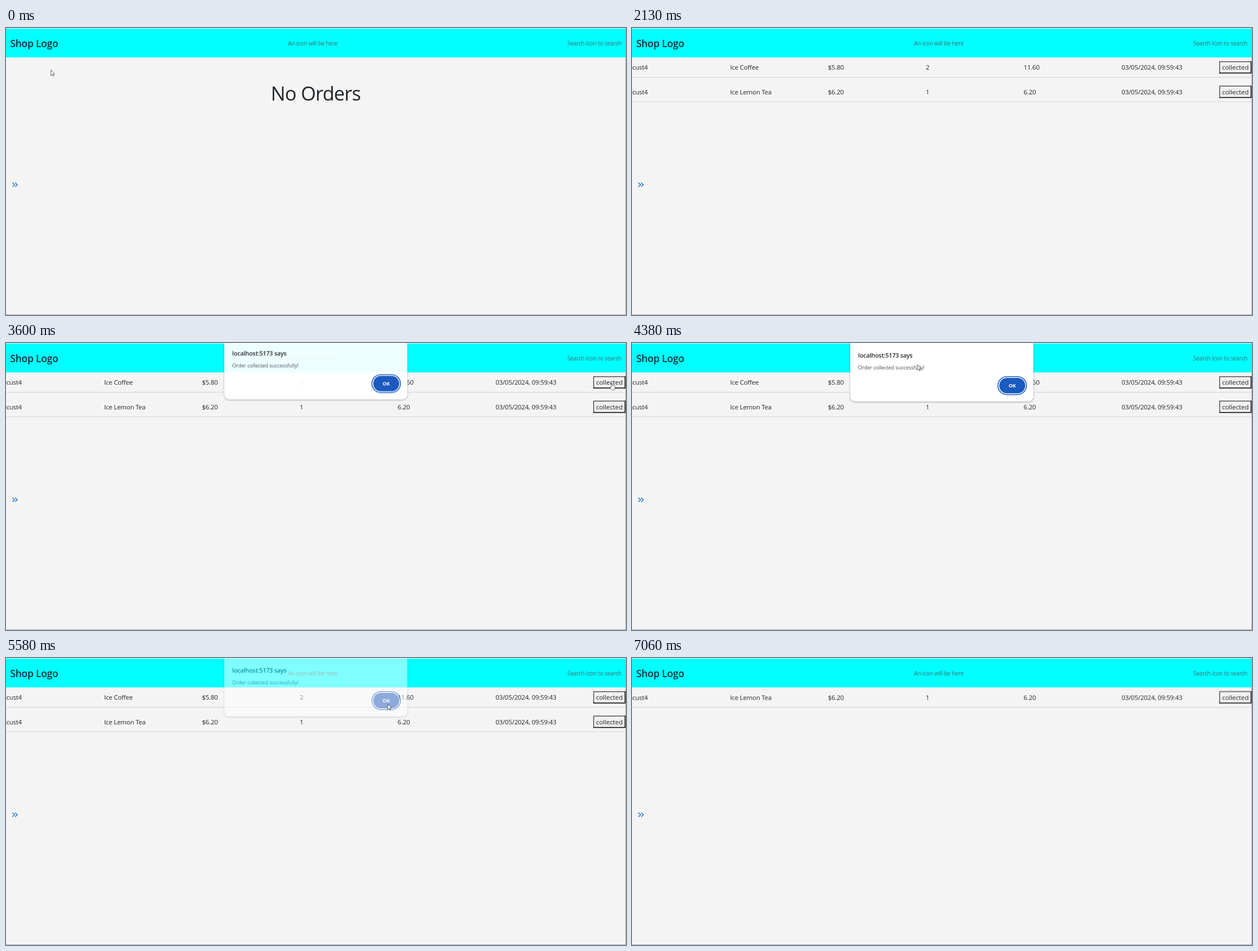
An HTML page for the animation above (7310 ms loop, 1098 by 510 pixels).

```html
<!DOCTYPE html>
<html lang="en">
<head>
<meta charset="utf-8">
<title>Shop orders</title>
<style>
  html, body { margin: 0; width: 100%; height: 100%; overflow: hidden; background: #f4f4f4; }
  svg { display: block; width: 1098px; height: 510px; font-family: "Open Sans", "Noto Sans", sans-serif; }
  text { white-space: pre; }
  .brand { font-size: 17.4px; font-weight: 600; letter-spacing: -.012em; fill: #123133; }
  .nav { font-size: 9.9px; letter-spacing: -.01em; fill: #456b6b; }
  .title { font-size: 34.2px; letter-spacing: -.021em; fill: #212529; }
  .cell { font-size: 11.4px; letter-spacing: -.016em; fill: #212529; }
  .btn { font-size: 11.5px; letter-spacing: -.006em; fill: #212529; }
  .edge { fill: none; stroke-width: 1.5; }
  .head { font-size: 10.7px; font-weight: 600; letter-spacing: -.014em; fill: #26282b; }
  .msg { font-size: 9.1px; letter-spacing: -.01em; fill: #4b4d50; }
  .ok { font-size: 8.8px; font-weight: 700; fill: #fff; }
  #panel { fill: #fff; filter: drop-shadow(0 1px 1.5px rgba(0, 0, 0, .35)); }
  #pointer { fill: #fff; stroke: #333; stroke-width: .75; stroke-linejoin: round; }
</style>
</head>
<body>
<svg viewBox="0 0 1098 510">
  <rect width="1098" height="510" fill="#f4f4f4"/>
  <rect y="1" width="1098" height="51.3" fill="#0ff"/>
  <text class="brand" x="7.4" y="33.9">Shop Logo</text>
  <text class="nav" x="543.3" y="30.8" text-anchor="middle">An icon will be here</text>
  <text class="nav" x="1090" y="30.8" text-anchor="end">Search Icon to search</text>

  <text class="title" id="empty" x="548.6" y="129" text-anchor="middle">No Orders</text>
  <g id="orders"></g>

  <g fill="#1976d2" transform="translate(7.3 269.8) scale(.723)">
    <path d="M6.41 6 5 7.41 9.58 12 5 16.59 6.41 18l6-6z"/>
    <path d="m13 6-1.41 1.41L16.17 12l-4.58 4.59L13 18l6-6z"/>
  </g>
  <path d="M1097.5 0V509.5H0" fill="none" stroke="#a9a9a9"/>

  <g id="dialog">
    <path id="panel" d="M386.5 -6H710.8V95a9 9 0 0 1-9 9H395.5a9 9 0 0 1-9-9z"/>
    <text class="head" x="400.6" y="25.8">localhost:5173 says</text>
    <text class="msg" x="400.6" y="47">Order collected successfully!</text>
    <rect x="648" y="59.7" width="50.6" height="32" rx="16" fill="#fff" stroke="#1b5cc0" stroke-width="1.6"/>
    <rect id="ok" x="650.4" y="62" width="46" height="27.4" rx="13.7"/>
    <text class="ok" x="673.3" y="78.9" text-anchor="middle">OK</text>
  </g>

  <g id="pointer">
    <path id="arrow" d="M.5.5V10.4L2.8 8.3 4.2 11.6 5.8 10.9 4.4 7.7H7.3Z"/>
    <path id="hand" d="M3.2 8.6V1.6a.9.9 0 0 1 1.8 0V5.6q.9-.7 1.7.2q.9-.6 1.6.3q1.3-.4 1.3.9V10q0 1.6-1.1 3.6H4.3Q2.6 11.6.8 8.9q.2-1.4 2.4-.3z"/>
  </g>
</svg>
<script>
const LOOP = 7310, TICK = 135, PITCH = 43.5, COLUMN = 173.3;
const $ = id => document.getElementById(id);
const at = (x, y) => `translate(${x}px, ${y}px)`;

// Order table
const orders = [
  ['cust4', 'Ice Coffee', '$5.80', '2', '11.60', '03/05/2024, 09:59:43'],
  ['cust4', 'Ice Lemon Tea', '$6.20', '1', '6.20', '03/05/2024, 09:59:43']
];
const rowMarkup = (cells, i) => `
  <g id="row${i}"><g transform="translate(0 ${i * PITCH})">
    ${cells.map((c, k) => `<text class="cell" x="${.4 + k * COLUMN}" y="74">${c}</text>`).join('')}
    <rect x="1040.5" y="59.3" width="56" height="21" fill="#f0f0f0"/>
    <path class="edge" id="lit${i}" stroke="#555" d="M1040.7 80.6V59.7H1096.8"/>
    <path class="edge" id="dark${i}" stroke="#000" d="M1040 80.1H1096.4V59"/>
    <text class="btn" x="1068.6" y="74" text-anchor="middle">collected</text>
    <rect y="87" width="1097" height="1" fill="#d2d4d6"/>
  </g></g>`;
$('orders').innerHTML = orders.map(rowMarkup).join('');

function play(id, prop, steps, ease) {
  const frames = steps.map(([t, v], i) => ({ offset: t / LOOP, [prop]: v, easing: ease(i) }));
  frames.push({ offset: 1, [prop]: steps[steps.length - 1][1] });
  $(id).animate(frames, { duration: LOOP, iterations: Infinity });
}
// Each value holds until the next step.
const hold = (id, prop, ...steps) => play(id, prop, steps, () => 'step-end');
// Show an element from one time to another.
const show = (id, from, to) => hold(id, 'opacity', [0, 0], [from, 1], [to, 0]);

const route = [
  [0, 79, 74], [165, 79, 74], [300, 365, 126], [810, 771, 137], [960, 745, 137],
  [1200, 446, 25], [1470, 162, 110], [1740, 740, 217], [1860, 930, 214],
  [2010, 1070, 121], [2130, 1110, 80], [2275, 1110, 80],
  [2410, 1088, 67], [2800, 1068.7, 70], [3705, 1068.7, 70],
  [3840, 930, 65], [4110, 716, 48], [4500, 399, 33], [4770, 656, 100], [4920, 723, 95],
  [5310, 675.5, 81], [6145, 675.5, 81], [6400, 838, 395], [6670, 1057, 453], [7060, 1075, 515]
];
const ticks = i => {
  const end = route[i + 1] ? route[i + 1][0] : LOOP;
  return `steps(${Math.max(1, Math.round((end - route[i][0]) / TICK))}, end)`;
};
play('pointer', 'transform', route.map(([t, x, y]) => [t, at(x, y)]), ticks);
show('hand', 2410, 3840);
hold('arrow', 'opacity', [0, 1], [2410, 0], [3840, 1]);

// Orders arrive, then the first one is collected
hold('empty', 'opacity', [0, 1], [570, 0]);
hold('orders', 'opacity', [0, 0], [570, 1]);
hold('row0', 'opacity', [0, 1], [5850, 0]);
hold('row1', 'transform', [0, at(0, 0)], [5850, at(0, -PITCH)]);
hold('lit0', 'stroke', [0, '#555'], [3080, '#000'], [3200, '#555']);
hold('dark0', 'stroke', [0, '#000'], [3080, '#555'], [3200, '#000']);

// Dialog slides in, then fades
hold('dialog', 'opacity', [0, 0], [3600, 1], [5580, .5], [5730, 0]);
hold('dialog', 'transform', [0, at(0, -3.6)], [3720, at(0, 0)]);
hold('panel', 'opacity', [0, .93], [3720, 1]);
hold('ok', 'fill', [0, '#1b5abe'], [5190, '#2660c4']);
</script>
</body>
</html>
```
